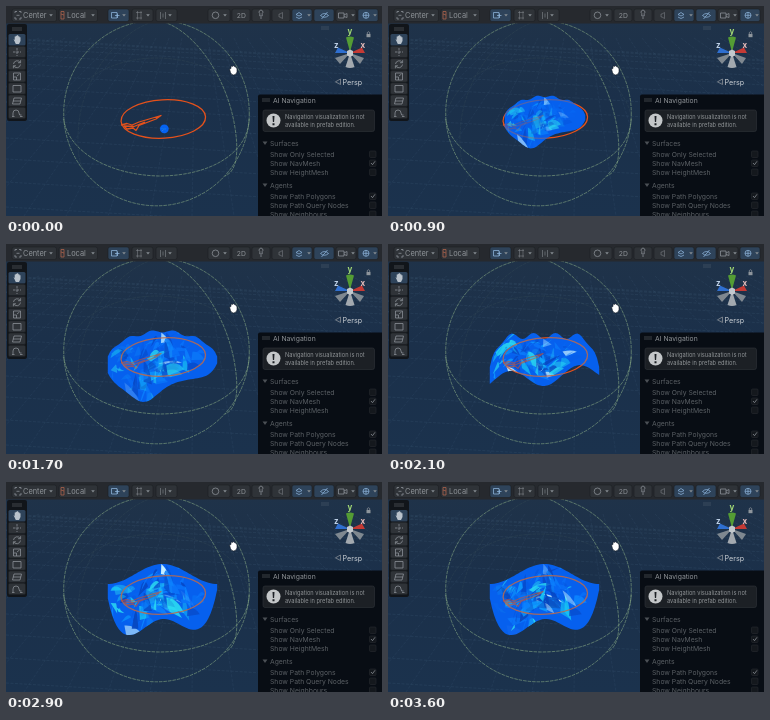
These frames come from a looping animation (376 px wide and 210 px high, 3.7 s). An HTML page:

```html
<!DOCTYPE html>
<html lang="en">
<head>
<meta charset="utf-8">
<title>Wave sheet in a scene view</title>
<style>
html, body { margin: 0; width: 100%; height: 100%; overflow: hidden; background: #1d3047; }
svg { display: block; width: 100vw; height: 100vh; }
text { font-family: Inter, Roboto, sans-serif; font-size: 6.8px; fill: #5b6065; }
.line { fill: none; stroke: #8f959b; stroke-width: .75; }
.blue .line, .line.blue { stroke: #8fb6dc; }
.wire { fill: none; stroke: #8fb389; stroke-width: .55; stroke-dasharray: 3.5 1; }
.ring { fill: none; stroke: #e4511b; stroke-width: 1.3; stroke-linejoin: round; }
.bar text { font-size: 7.4px; fill: #8f9499; }
.axis { font-size: 8px; font-weight: 700; }
.note { font-size: 5.7px; fill: #8f9396; }
.btn { fill: #2f3338; stroke: #1d2024; stroke-width: .6; }
.on { fill: #2e435a; }
</style>
</head>
<body>
<svg viewBox="0 0 376 210" preserveAspectRatio="none">
  <defs>
    <linearGradient id="sky" x2="0" y2="1">
      <stop offset="0" stop-color="#203349"/>
      <stop offset=".45" stop-color="#1b304a"/>
      <stop offset="1" stop-color="#1b324d"/>
    </linearGradient>
    <clipPath id="clip"><path id="clipShape"/></clipPath>
    <ellipse id="loop" cx="157.300" cy="113" rx="42.300" ry="19.200" transform="rotate(-3 157 113)"/>
    <path id="arrow" d="M115 119L121 117.500L126 119L133 116L155 109.500L150 113L133 119.500L130 124.500L127 122L121 123L118 120L128 120.500L139 116"/>
    <path id="caret" d="M-1.800-1H1.800L0 1.300Z" fill="#868c92"/>
  </defs>

  <rect width="376" height="210" fill="url(#sky)"/>
  <g id="grid" stroke="#6d95b5" stroke-width=".5" stroke-dasharray="3 1.500" fill="none"></g>

  <g class="wire">
    <circle cx="150.500" cy="107" r="92.800"/>
    <path d="M57.700 113C62 146 104 169 153 170C203 170 242 148 243.200 113"/>
    <path d="M153 14.500C188 23 219 69 228 116C233 143 232 165 219 170"/>
    <path d="M57.700 111C67 70 112 52 150 52S233 68 243 109M151 14.500C113 24 78 70 73 116C70 146 73 160 82 169" opacity=".14"/>
  </g>

  <use href="#loop" class="ring"/>
  <use href="#arrow" class="ring"/>
  <circle cx="158.300" cy="122.800" r="4.400" fill="#0563f3"/>
  <path id="sheet" fill="#0660ee"/>
  <g clip-path="url(#clip)">
    <g id="glints"></g>
    <g id="overlay">
      <use href="#loop" class="ring" style="stroke:#bd6a4c"/>
      <use href="#arrow" class="ring" opacity=".65"/>
    </g>
  </g>

  <!-- orientation gizmo -->
  <path d="M344 47L329 52L334 58ZM344 47L358 52L354 58Z" fill="#7f8890"/>
  <path d="M344 47L339.500 61Q344 63 348.500 61Z" fill="#a3a9af"/>
  <path d="M344 47L329 47L332 41.500Z" fill="#2f6fd0"/>
  <path d="M344 47L359 47L356 41.500Z" fill="#c43a35"/>
  <path d="M344 46L340 31.500Q344 29.500 348 31.500Z" fill="#549c34"/>
  <path d="M341 45L344 43.500L347 45V49.500L344 51L341 49.500Z" fill="#c3c9ce"/>
  <text class="axis" x="341.500" y="28" style="fill:#a5dc76">y</text>
  <text class="axis" x="328" y="42" style="fill:#c2d4ea">z</text>
  <text class="axis" x="354.500" y="42" style="fill:#e6bdbb">x</text>
  <rect x="360.500" y="28" width="4" height="3.200" fill="#8e959c"/>
  <path class="line" d="M361.300 28V26.500Q362.500 25 363.700 26.500V28M334.500 73L329.500 75.800L334.500 78.500Z"/>
  <text x="336.500" y="78.500" style="font-size:7.200px;fill:#c9ced3">Persp</text>
  <path class="line" d="M315 21H323M315 23H323" opacity=".35"/>

  <!-- hand pointer -->
  <path d="M223.500 63L225 62.500V60.500Q226 59.500 226.500 60.500Q227.500 59 228.300 60.500Q229.500 60 229.800 61.500Q231 61.500 231 63V66Q230 69 227.500 69Q225.500 69 224.500 66.500Z" fill="#fff" stroke="#111a24" stroke-width=".6"/>

  <!-- top bar -->
  <rect width="376" height="17.500" fill="#26292e"/>
  <g id="buttons"></g>
  <g class="bar">
    <g class="line">
      <path d="M9 7V5.500H11M13 5.500H15V7M9 11V13H11M13 13H15V11M10.500 9.300H13.500"/>
      <path d="M55 5.500H58V13H55ZM55 8L58 9" stroke="#b0644c"/>
      <path d="M130 6.500H136M130 12H136M131.500 5V13.500M135 5V13.500" opacity=".6"/>
      <path d="M154.500 6V13M159.500 6V13M157 7.500V11.500" opacity=".7"/>
      <circle cx="209.500" cy="9.300" r="3.300"/>
      <path d="M253.800 7.500A1.900 1.900 0 1 1 256.200 7.500V10H253.800ZM254 12H256"/>
      <path d="M273 8H274L276.500 6.500V12.500L274 11H273Z" opacity=".6"/>
      <path d="M332.500 7H338V12H332.500ZM338 9L341 7.500V11.500L338 10.500"/>
    </g>
    <g class="blue">
      <path class="line" d="M105.500 6.500H111V12H105.500ZM109 9.500H113.500M111.500 7.500V12"/>
      <path class="line" d="M290 8.500L293 6.500L296 8.500L293 10ZM290 11L293 12.500L296 11"/>
      <path class="line" d="M314.500 9.500Q318.500 5.500 322.500 9.500Q318.500 13 314.500 9.500M315.500 13L321.500 6"/>
      <path class="line" d="M357 9.300A3 3 0 1 1 363 9.300A3 3 0 1 1 357 9.300H363M360 6.300V12.300"/>
    </g>
    <text x="17" y="12">Center</text>
    <text x="61" y="12">Local</text>
    <text x="230.800" y="12" style="font-size:6.800px">2D</text>
  </g>

  <!-- tool strip -->
  <rect x="1" y="18" width="20" height="97" rx="2" fill="#11151a"/>
  <path class="line" d="M6 22H16M6 24H16" opacity=".5"/>
  <g id="tools"></g>
  <path d="M7.500 33L8.700 34V30.500H9.800V29.700H11V29.300H12.200V30.300H13.400V31.200H14.500V35L13 38H9.800Z" fill="#b9c2cb"/>
  <g class="line">
    <path d="M11 42V50M7 46H15" stroke-dasharray="2.500 1"/>
    <path d="M14.300 56.500A3.700 3.700 0 0 0 7.500 58M7.700 60A3.700 3.700 0 0 0 14.500 58.500M14.600 54.200V56.700H12M7.400 62.300V59.800H10"/>
    <path d="M7.500 67H14.500V74H7.500ZM7.500 71H10.500V74M11 70L13.500 68"/>
    <path d="M7 79.500H15V86H7Z"/>
    <path d="M8 92H15.500L14 98H6.500ZM7 95H15"/>
    <path d="M7 110V107Q7 104 10 104T13 107T15.500 109M6 110.500H8.500M14 110.500H16.500"/>
  </g>

  <!-- navigation panel -->
  <rect x="252" y="88.500" width="126" height="124" rx="2" fill="#080d14"/>
  <path class="line" d="M256 93H264M256 95H264" opacity=".5"/>
  <text x="267" y="96.800" style="fill:#92969a">AI Navigation</text>
  <rect x="257" y="104" width="111.500" height="21.500" rx="2" fill="#1c2025" stroke="#303439" stroke-width=".6"/>
  <circle cx="267.500" cy="114.500" r="7" fill="#c4c7c9"/>
  <path d="M266.500 110H268.500L268.100 116H266.900ZM266.500 117.300H268.500V119.200H266.500Z" fill="#1c2025"/>
  <text class="note" x="279" y="113">Navigation visualization is not</text>
  <text class="note" x="279" y="121">available in prefab edition.</text>
  <g id="rows"></g>
</svg>

<script>
const $ = id => document.getElementById(id);
function add(parent, tag, attrs, content) {
  const el = document.createElementNS("http://www.w3.org/2000/svg", tag);
  for (const key in attrs) el.setAttribute(key, attrs[key]);
  if (content) el.textContent = content;
  return parent.appendChild(el);
}

// Ground grid: rows crowd towards the horizon, columns fan out
for (let i = 0; i < 14; i++) {
  const y = 32 + i * i;
  add($("grid"), "path", { d: `M0 ${y}L376 ${y + 22}`, opacity: .2 });
}
for (let i = -12; i < 26; i++) {
  add($("grid"), "path", { d: `M${150 + i * 13} 32L${60 + i * 42} 210`, opacity: .17 });
}

function button(x, width, on) {
  add($("buttons"), "rect", { x, y: 3, width, height: 12.5, rx: 2, class: on ? "btn on" : "btn" });
}
button(6, 44.5);
button(53, 38.5);
for (let i = 0; i < 3; i++) {
  button(102 + i * 24, 21, i === 0);
  button(226 + i * 20, 18);
}
button(202, 22);
for (let i = 0; i < 4; i++) button(286 + i * 22, 20, i !== 2);
for (const x of [45, 87, 118, 142, 164, 219, 303, 347, 369]) {
  add($("buttons"), "use", { href: "#caret", x, y: 9.3 });
}
for (let i = 0; i < 7; i++) {
  add($("tools"), "rect", { x: 2.5, y: 28 + i * 12.2, width: 17, height: 11.4, rx: 1.5, class: i ? "btn" : "on" });
}

// Panel sections; a star marks a ticked option
const sections = {
  Surfaces: ["Show Only Selected", "Show NavMesh*", "Show HeightMesh"],
  Agents: ["Show Path Polygons*", "Show Path Query Nodes", "Show Neighbours"]
};
let y = 140;
for (const title in sections) {
  add($("rows"), "path", { d: `M256.500 ${y - 4.5}H261.500L259 ${y - 1}Z`, fill: "#4b5055" });
  add($("rows"), "text", { x: 264, y }, title);
  y += 2;
  for (const option of sections[title]) {
    y += 9;
    add($("rows"), "text", { x: 264, y }, option.replace("*", ""));
    add($("rows"), "rect", { x: 363.5, y: y - 6, width: 6.5, height: 6.5, rx: 1, fill: "#14181d", stroke: "#272b30", "stroke-width": .6 });
    if (option.endsWith("*")) add($("rows"), "path", { d: `M365 ${y - 3}L366.500 ${y - 1.3}L369 ${y - 4.7}`, class: "line" });
  }
  y += 13;
}

// Sheet edges across c = -1..1, swung between s = 1 and s = -1
const upper = (c, s) => 92 - 5 * (1 + s) * Math.cos(Math.PI * c) + (1 - s) * (17 * c ** 8 + 1.5 * Math.cos(5 * Math.PI * c));
const lower = (c, s) => 138.5 + 5.5 * s + (1 - 8 * s) * Math.cos(5 * c) - 4.5 * c - 15 * (1 + s) * c ** 8
  + 18 * (1 - s * s) * Math.exp(-(((c + .35) / .35) ** 2));

let seed = 41;
const rand = () => (seed = seed * 16807 % 2147483647) / 2147483647;
const around = (mid, reach) => mid + (rand() + rand() - 1) * reach;
const tints = ["#18c4f4", "#0c84ff", "#0847c0", "#2ad8f2", "#0a74fb", "#0e9cff", "#0749c8"];
const glints = Array.from({ length: 130 }, (_, i) => ({
  c: around(-.15, .9), v: around(.45, .5),
  dc: around(.12, .35), dv: around(.1, .4),
  wide: .02 + rand() * .09, phase: rand() * 6.28,
  el: add($("glints"), "path", { fill: i % 19 ? tints[i % tints.length] : "#d2f6ff" })
}));

function draw(t) {
  const grow = Math.min(1, .06 + t / 1330);
  const rise = 123 - 24 * Math.min(1, t / 600);
  // One half swing takes 800 ms; the last stretch runs faster
  const beat = (t - 1300) / 800;
  const s = Math.cos(Math.PI * (beat + 1.29 * Math.max(0, beat - 2)));
  const at = (c, v) => {
    const top = upper(c, s), height = top + (lower(c, s) - top) * v;
    return (158.5 + grow * (54.7 * c - 2)).toFixed(1) + " " + (rise + grow * (height - rise)).toFixed(1);
  };

  const n = 50, over = [], under = [];
  for (let i = 0; i <= n; i++) {
    const c = i / n * 2 - 1;
    over.push(at(c, 0));
    under.unshift(at(c, 1));
  }
  const outline = "M" + over.concat(under).join("L") + "Z";
  $("sheet").setAttribute("d", outline);
  $("clipShape").setAttribute("d", outline);

  const shine = .45 + .5 * Math.min(1, t / 2500);
  for (const { c, v, dc, dv, wide, phase, el } of glints) {
    el.setAttribute("d", `M${at(c, v)}Q${at(c + dc * .6, v + dv * .3 - wide)} ${at(c + dc, v + dv)}L${at(c + dc * .4 - wide, v + dv * .6 + wide)}Z`);
    el.setAttribute("opacity", (shine * Math.max(0, .5 + .5 * Math.sin(t / 170 + phase))).toFixed(2));
  }
  $("overlay").setAttribute("opacity", .85 * Math.min(1, t / 1300) ** 2);
}

const begin = performance.now();
function tick() {
  const t = (performance.now() - begin) % 3700;
  draw(Math.floor(t / 100) * 100);
  requestAnimationFrame(tick);
}
tick();
</script>
</body>
</html>
```
